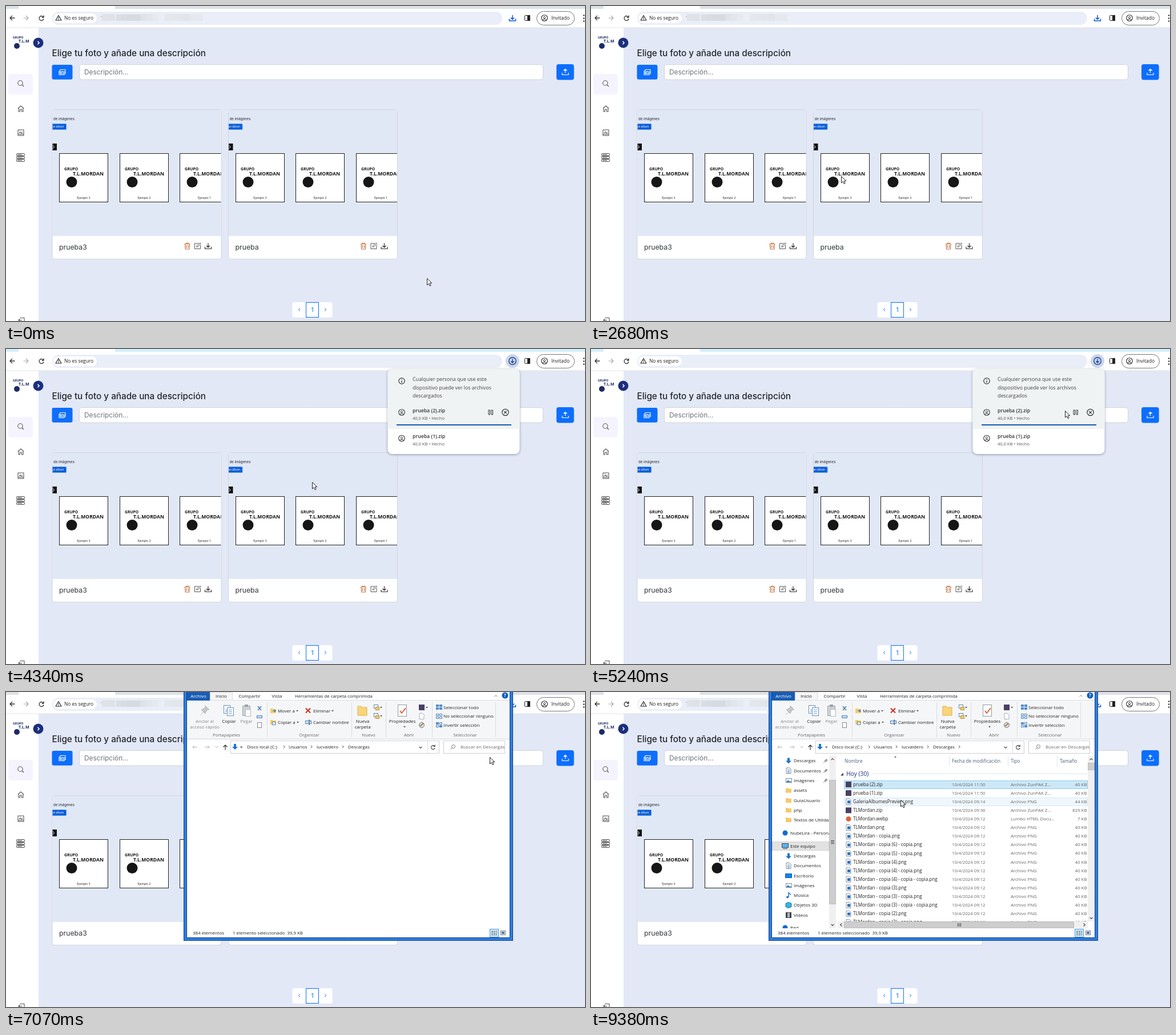
Animation, 1014 px wide and 552 px high, one loop 9510 ms. Source, as an HTML page with a canvas:

```html
<!DOCTYPE html>
<html lang="es">
<head>
<meta charset="utf-8">
<title>Galería</title>
<style>
html, body { margin: 0; width: 100%; height: 100%; overflow: hidden; }
canvas { display: block; width: 1014px; height: 552px; }
</style>
</head>
<body>
<canvas id="stage" width="1014" height="552"></canvas>
<script>
const ctx = document.getElementById('stage').getContext('2d');
const LOOP = 9510, STEP = 70;
const WEB = 'Inter, sans-serif', UI = '"Open Sans", "Noto Sans", sans-serif';
const BLUE = '#0d6efd', INK = '#212529', GREY = '#666';

// ---- drawing helpers ----
function rect(x, y, w, h, fill, stroke) {
  if (fill) { ctx.fillStyle = fill; ctx.fillRect(x, y, w, h); }
  if (stroke) { ctx.strokeStyle = stroke; ctx.lineWidth = 1; ctx.strokeRect(x + .5, y + .5, w - 1, h - 1); }
}
function round(x, y, w, h, r, fill, stroke) {
  ctx.beginPath();
  ctx.roundRect(x, y, w, h, r);
  if (fill) { ctx.fillStyle = fill; ctx.fill(); }
  if (stroke) { ctx.strokeStyle = stroke; ctx.lineWidth = 1; ctx.stroke(); }
}
function disc(x, y, r, fill, stroke, width = 1) {
  ctx.beginPath();
  ctx.arc(x, y, r, 0, 7);
  if (fill) { ctx.fillStyle = fill; ctx.fill(); }
  if (stroke) { ctx.strokeStyle = stroke; ctx.lineWidth = width; ctx.stroke(); }
}
function path(d, x, y, stroke, width = 1, fill) {
  const p = new Path2D(d);
  ctx.save();
  ctx.translate(x, y);
  if (fill) { ctx.fillStyle = fill; ctx.fill(p); }
  if (stroke) {
    ctx.strokeStyle = stroke; ctx.lineWidth = width; ctx.lineJoin = 'round';
    ctx.stroke(p);
  }
  ctx.restore();
}
function text(s, x, y, size = 8.1, color = '#222', { font = UI, weight = 400, align = 'left' } = {}) {
  ctx.font = `${weight} ${size}px ${font}`;
  ctx.textAlign = align;
  ctx.fillStyle = color;
  ctx.fillText(s, x, y + size * .34);
}
function clipped(x, y, w, h, draw) {
  ctx.save();
  ctx.beginPath();
  ctx.rect(x, y, w, h);
  ctx.clip();
  draw();
  ctx.restore();
}
const mid = { align: 'center' };
const DOWN = 'M-2.5 -1.2L0 1.3L2.5 -1.2', RIGHT = 'M-1.5 -2.6L1.2 0L-1.5 2.6', LEFT = 'M1.5 -2.6L-1.2 0L1.5 2.6';
const UP = 'M-2.5 1.2L0 -1.3L2.5 1.2', CARET = 'M-2 -1H2L0 1.3Z';
const SAVE = 'M0 -5V2.5M-3 -.5L0 2.5L3 -.5M-5.5 1.5V5H5.5V1.5';
const PERSON = 'M-3.4 3.8C-2 1.2 2 1.2 3.4 3.8M0 -2.6A1.7 1.7 0 1 0 .01 -2.6';

// ---- browser ----
function browser(active, open) {
  rect(0, 0, 1014, 38, '#fff');
  rect(0, 0, 1014, 5, active ? '#d3f0fb' : '#dee1e6');
  round(22, -6, 169, 14, 4, '#fff');
  rect(0, 5, 1014, 33, '#fff');
  path('M4.5 0H-4M0 -4L-4 0L0 4', 11, 21, '#333', 1.3);
  path('M-4.5 0H4M0 -4L4 0L0 4', 35, 21, '#aaa', 1.2);
  path('M3.6 -2A4 4 0 1 0 4 1M4 -5V-1.5H.6', 62, 21.5, '#333', 1.3);
  round(81, 10, 788, 23, 11.5, '#e9eef8');
  round(83, 13, 76, 17, 8.5, '#fff');
  path('M0 -4.5L5 4H-5ZM0 -1.5V1.5M0 2.3V3.2', 92, 21, '#222', 1.1);
  text('No es seguro', 102, 21.3, 8.4);
  if (!active) blurredUrl();
  if (open) {
    disc(887, 21, 12, '#cbd6eb');
    disc(887, 21, 6.2, null, '#173f8f', 1.4);
    path('M0 -3.5V3M-2.7 .4L0 3L2.7 .4', 887, 21, '#173f8f', 1.4);
  } else path(SAVE, 887, 21, '#0b57d0', 1.5);
  round(908.5, 16.5, 9, 9, 1, '#fff', '#222');
  rect(913, 16, 5, 10, '#222');
  round(929.5, 9.5, 66, 24, 12, '#fff', '#777');
  disc(943, 21, 5.3, null, '#222', 1.1);
  path(PERSON, 943, 21, '#222');
  text('Invitado', 955, 21.3, 8.5);
  for (const y of [16.5, 21.5, 26.5]) disc(1012, y, 1.2, '#333');
  rect(0, 37.5, 1014, 1, '#e1e4ec');
}
function blurredUrl() {
  rect(166, 18, 2, 1, '#a5a9b0');
  for (let i = 0; i < 16; i++) {
    if (i === 9) continue;
    const n = (i * 37 + 11) % 17, g = 233 - n * (i < 7 ? .6 : .3);
    rect(168 + i * 11, 14, 11, 12, `rgb(${g - 3},${g},${g + 5})`);
  }
  rect(193, 15, 42, 11, 'rgba(170,175,190,.2)');
}

// ---- web page ----
function brand(x, y, color, small) {
  const o = { weight: 700 };
  text('GRUPO', x, y, small ? 5.2 : 6.8, color, o);
  text(small ? 'T.L.M' : 'T.L.MORDAN', x + (small ? 10 : 15), y + (small ? 6.5 : 8.5), small ? 7.2 : 8.6, color, o);
  disc(x + (small ? 7 : 13), y + (small ? 15 : 22.5), small ? 5 : 9.5, color);
}
function sidebar() {
  rect(0, 38, 57, 514, '#fff');
  brand(12, 55, '#1d2b64', true);
  disc(56.5, 64.5, 9, '#1b2f7d');
  path(RIGHT, 57, 64.5, '#fff', 1.5);
  round(4, 119, 43, 36, 4, '#f5f4fe');
  const c = '#555';
  disc(25, 135, 4.2, null, c, 1.1);
  path('M3 3L6 6', 25, 135, c, 1.2);
  path('M-5 -.5L0 -5L5 -.5M-4 -1.3V5H-1.5V1H1.5V5H4V-1.3', 26, 180, c, 1.1);
  path('M-5 -5H5V5H-5ZM-5 3H5M-3 1L-1 -1L1 1L2 0L3 1M-2 -3H-1', 26, 222, c, 1.1);
  for (const y of [258.5, 263.5, 268.5]) {
    round(18.5, y, 14, 4, 1, null, '#444');
    rect(20, y + 1.5, 8, 1, '#444');
  }
  path('M-2 -2V-3H5V5H-2M1 1H-5M-3 -1L-5 1L-3 3', 27, 549.5, c, 1.1);
}
function card(x, name) {
  round(x, 181.5, 296, 262, 4, '#fff', '#d0d4dc');
  clipped(x + .5, 182, 295, 221, () => {
    rect(x, 182, 296, 221, '#e1e8f5');
    text('de imágenes', x + 2, 198, 6.1, INK, { font: WEB });
    round(x - 4, 206.5, 28.5, 10, 1, '#0b5ed7', '#5598f2');
    text('un álbum', x, 211.5, 4.7, '#fff', { font: WEB });
    rect(x, 241, 8, 12, '#111');
    path(RIGHT, x + 2.5, 247, '#fff', 1);
    for (let i = 0; i < 3; i++) {
      const tx = Math.round(x + 12.4 + i * 105.4);
      rect(tx, 258, 86, 86, '#fff', '#222');
      brand(tx + 9, 286, '#161616');
      text('Ejemplo ' + (3 - i), tx + 43, 336, 5, '#222', { font: WEB, align: 'center' });
    }
  });
  text(name, x + 12, 422.5, 12.3, '#343a40', { font: WEB });
  path('M-5 -3.5H5M-2 -3.5V-5H2V-3.5M-4 -3.5L-3.4 5.5H3.4L4 -3.5M-1.6 -1.5V3.5M1.6 -1.5V3.5', x + 236.5, 420.5, '#c4703f', 1.1);
  path('M2 -4.5H-5V5H5V-1.5M-1.8 2L-1.2 -.5L4.5 -5.5L5.8 -4L.5 1.2Z', x + 254.5, 420.5, '#555');
  path(SAVE, x + 273, 420.5, '#333', 1.2);
}
function page() {
  rect(0, 38, 1014, 514, '#e3e8f7');
  sidebar();
  text('Elige tu foto y añade una descripción', 80.5, 82.5, 15.28, INK, { font: WEB, weight: 500 });
  round(80.5, 103, 36, 25.7, 3, BLUE);
  path('M-3.5 -4.5H5.5V2.5H-3.5ZM-3.5 -2H-5.5V4.5H3.5V2.5M-3 1.5L0 -1.5L2 .5L3.5 -1L5 1', 98.5, 116, '#fff', 1.1);
  round(128.5, 102.5, 812, 26.5, 4, '#fff', '#ced4da');
  text('Descripción...', 137, 115.7, 11.9, '#6c757d', { font: WEB });
  round(964, 102, 30.7, 27.4, 4, BLUE);
  path('M0 2V-5M-3 -2L0 -5L3 -2M-5.5 1.5V5H5.5V1.5', 979.5, 115.5, '#fff', 1.2);
  card(81, 'prueba3');
  card(389.5, 'prueba');
  round(501.5, 519, 70, 27, 4, '#fff');
  rect(525, 519, 23, 27, '#fff', BLUE);
  text('1', 536.5, 532.5, 11, BLUE, { font: WEB, align: 'center' });
  path(LEFT, 513.5, 532, BLUE);
  path(RIGHT, 559.5, 532, BLUE);
}

// ---- downloads bubble ----
function bubble(alpha) {
  ctx.save();
  ctx.globalAlpha = alpha;
  ctx.shadowColor = 'rgba(40,50,80,.45)';
  ctx.shadowBlur = 4;
  ctx.shadowOffsetY = 1;
  round(668.5, 35, 231, 149, 8, '#fff');
  ctx.shadowColor = 'transparent';
  round(668.5, 35, 231, 105, [8, 8, 0, 0], '#f0f3f3');
  disc(693, 56, 5.2, null, '#333', 1.2);
  path('M0 -.5V3M0 -3V-1.8', 693, 56, '#333', 1.3);
  ['Cualquier persona que use este', 'dispositivo puede ver los archivos', 'descargados']
    .forEach((s, i) => text(s, 712, 53.5 + i * 14.4, 8.8, '#444'));
  ['prueba (2).zip', 'prueba (1).zip'].forEach((s, i) => {
    const y = 108 + i * 45.5;
    disc(693, y + 3, 5.3, null, '#333', 1.1);
    path(PERSON, 693, y + 3, '#333');
    text(s, 712, y, 8.7, '#333', { weight: 600 });
    text('40,0 KB • Hecho', 712, y + 13, 7.6, '#555');
  });
  path('M-3.5 -4H-1V4H-3.5ZM1.5 -4H4V4H1.5Z', 848.5, 111, '#333');
  disc(874.5, 111, 5.7, null, '#333', 1.2);
  path('M-2.3 -2.3L2.3 2.3M2.3 -2.3L-2.3 2.3', 874.5, 111, '#333', 1.2);
  rect(684, 132, 201, 2, '#1558b8');
  ctx.restore();
}

// ---- file explorer ----
const FOLDER = 'M-5 -4H-1L0 -3H5V4H-5Z', SHEET = 'M-4 -5H2L4 -3V5H-4Z';
function icon(kind, x, y) {
  if (kind === 'down') path('M-2 -5H2V0H5L0 5L-5 0H-2Z', x, y, null, 1, '#1976d2');
  if (kind === 'sheet') {
    path(SHEET, x, y, '#7c8794', 1, '#fff');
    path('M-2 -1.5H2M-2 1H2M-2 3H2', x, y, '#3c82c4');
  }
  if (kind === 'folder') path(FOLDER, x, y, null, 1, '#f5ca67');
  if (kind === 'image') {
    rect(x - 5, y - 4, 11, 8, '#fff', '#7d8b99');
    path('M-4 3L-1 -1L2 2L3 1L5 3Z', x, y, null, 1, '#2f7ecb');
  }
  if (kind === 'pc') {
    rect(x - 6, y - 5, 12, 8, '#59b4f5', '#34495e');
    rect(x - 4, y + 4, 8, 1, '#34495e');
  }
  if (kind === 'desk') rect(x - 6, y - 4, 12, 8, '#1383e8', '#0b62b5');
  if (kind === 'note') {
    disc(x - 2, y + 3, 2, '#1678d4');
    path('M0 3V-5L4 -1', x, y, '#1678d4', 1.5);
  }
  if (kind === 'cube') path('M0 -5L5 -3V3L0 5L-5 3V-3Z', x, y, '#0e79b5', 1, '#39b1e6');
  if (kind === 'film') {
    rect(x - 5, y - 5, 10, 10, '#444');
    rect(x - 2, y - 4, 4, 8, '#a5b6c7');
  }
  if (kind === 'dot') disc(x, y, 4.5, '#0f6cd0');
  if (kind === 'zip') rect(x - 5, y - 5, 10, 10, '#4a3f66');
  if (kind === 'web') disc(x, y, 4.5, '#e2603a');
  if (kind === 'png') {
    path(SHEET, x, y, '#8793a0', 1, '#fff');
    rect(x - 2, y - 2, 5, 5, '#2b72c2');
  }
}
const NAV = [
  [120.5, 'down', 'Descargas'], [138, 'sheet', 'Documentos'], [155, 'image', 'Imágenes'],
  [172.5, 'folder', 'assets'], [190, 'folder', 'GuiaUsuario'], [207, 'folder', 'php'],
  [224, 'folder', 'Textos de Utilidad'], [247, 'dot', 'NubeLira - Personal'], [270, 'pc', 'Este equipo'],
  [287.5, 'down', 'Descargas'], [304.5, 'sheet', 'Documentos'], [322, 'desk', 'Escritorio'],
  [339, 'image', 'Imágenes'], [356.5, 'note', 'Música'], [373.5, 'cube', 'Objetos 3D'],
  [391, 'film', 'Vídeos'], [413, 'dot', 'Red']
];
const copies = ['', ' - copia', ' - copia (6) - copia', ' - copia (5) - copia', ' - copia (4)', ' - copia (4) - copia',
  ' - copia (4) - copia - copia', ' - copia (3)', ' - copia (3) - copia', ' - copia (3) - copia - copia',
  ' - copia (2)', ' - copia (2) - copia'];
const FILES = [
  ['zip', 'prueba (2).zip', '11:50', 40], ['zip', 'prueba (1).zip', '11:50', 40],
  ['png', 'GaleriaAlbumesPreview.png', '09:14', 44], ['zip', 'TLMordan.zip', '09:36', 829],
  ['web', 'TLMordan.webp', '09:12', 7],
  ...copies.map(c => ['png', `TLMordan${c}.png`, '09:12', 40])
];
const TYPES = { zip: 'Archivo ZunPAK Z...', png: 'Archivo PNG', web: 'Lumbo HTML Docu...' };

function frame() {
  const c = '#2b7de0';
  rect(311, 0, 6, 436, c);
  rect(882, 0, 6, 436, c);
  rect(311, 431, 577, 5, c);
  path('M.5 0V435.5H576.5V0M5.5 0V430.5H571.5V0', 311, 0, '#17407c');
}
function ribbon() {
  rect(317, 15, 565, 67, '#f5f6f7');
  rect(317, 14, 565, 1, '#dcdde0');
  rect(317, 82, 565, 1, '#d5d6d9');
  rect(317, 0, 40, 15, '#1a5cb4');
  rect(357, 0, 40, 15, '#f5f6f7', '#dcdde0');
  text('Archivo', 337, 7, 8, '#fff', mid);
  text('Inicio', 377, 7, 8, '#222', mid);
  text('Compartir', 426.5, 7, 8, '#222', mid);
  text('Vista', 474.5, 7, 8, '#222', mid);
  text('Herramientas de carpeta comprimida', 506, 7, 7.75);
  path(UP, 858, 7, '#777');
  disc(874, 6, 5.5, '#0c5fbf');
  text('?', 874, 6, 8, '#fff', { weight: 700, align: 'center' });
  for (const x of [457, 605, 665, 746, 857]) rect(x, 18, 1, 61, '#dcdde0');
  [['Portapapeles', 386], ['Organizar', 531], ['Nuevo', 635], ['Abrir', 706], ['Seleccionar', 804]]
    .forEach(([s, x]) => text(s, x, 75, 7.8, GREY, mid));
  [['Anclar al', 348, 51, '#888'], ['acceso rápido', 348, 61, '#888'], ['Copiar', 390.5, 51], ['Pegar', 421, 51, '#888'],
    ['Nueva', 624.5, 51], ['carpeta', 624.5, 61], ['Propiedades', 694, 51]]
    .forEach(([s, x, y, c = '#222']) => text(s, x, y, 8, c, mid));
  path('M1 -8L8 -1L5 -1L2 3L1 6L-6 -1L-3 -2L1 -5ZM-2 3L-7 8', 348, 32, '#b5b8bc', 1, '#c4c7ca');
  for (const x of [386, 392]) {
    rect(x - 5, x === 386 ? 23 : 27, 12, 15, '#fff', '#6c8fb5');
    for (let i = 0; i < 3; i++) rect(x - 2, 31 + i * 3, 6, 1, '#6ba3dc');
  }
  rect(414, 24, 14, 18, '#cdd2d8', '#a0a6ad');
  rect(418, 22, 6, 4, '#9aa0a8');
  rect(419, 30, 10, 13, '#fff', '#b3b8be');
  path('M-3 -4L3 3M3 -4L-3 3', 444, 29, '#3c6fa5', 1.3);
  rect(439, 41, 10, 5, '#c5dcf2', '#4c84bd');
  rect(440, 53, 8, 10, '#fff', '#888');
  path(FOLDER, 468, 33, null, 1, '#f5ca67');
  path('M-1 0H4M2 -2L4 0L2 2', 468, 33, '#1976d2', 1.2);
  path(FOLDER, 468, 53, null, 1, '#f5ca67');
  rect(466, 52, 6, 6, '#fff', '#4c84bd');
  path('M-4 -4L4 4M4 -4L-4 4', 529, 32.5, '#d02a1e', 1.9);
  rect(524, 50, 11, 6, '#cbe2f7', '#4c84bd');
  path('M0 -5V5', 531, 53, '#333');
  text('Mover a', 476, 33, 7.9); path(CARET, 510, 33, null, 1, '#444');
  text('Copiar a', 476, 53, 7.9); path(CARET, 511, 53, null, 1, '#444');
  text('Eliminar', 538, 33, 7.9); path(CARET, 572, 33, null, 1, '#444');
  text('Cambiar nombre', 538, 53, 7.9);
  path('M-8 -7H-2L0 -5H8V9H-8Z', 624, 32, '#e0b24b', 1, '#f8d57a');
  for (const y of [27, 42]) {
    rect(644, y - 5, 8, 7, '#fff', '#5e82a8');
    rect(647, y - 1, 7, 6, '#f5ca67', '#b69446');
    path(CARET, 657, y, null, 1, '#444');
  }
  rect(686, 22, 16, 21, '#fff', '#929aa3');
  path('M-4 0L-1 4L6 -5', 694, 33, '#e2603a', 2);
  path(CARET, 698, 61, null, 1, '#444');
  icon('zip', 728, 27);
  path(CARET, 737, 27, null, 1, '#444');
  path(SHEET, 728, 42.5, '#a6adb5', 1, '#fff');
  disc(728, 58, 4.5, '#ddd', '#777');
  path('M-3 2L3 -3', 728, 58, '#8a5a2b', 1.5);
  ['Seleccionar todo', 'No seleccionar ninguno', 'Invertir selección'].forEach((s, i) => {
    const y = 27 + i * 15.5;
    for (let k = 0; k < 4; k++)
      rect(753 + (k % 2) * 6, Math.round(y) - 5 + (k >> 1) * 5, 5, 4, i === 1 || (i === 2 && k % 3) ? '#fff' : '#4d9ae0', '#4c84bd');
    text(s, 766, y, 8);
  });
}
function addressBar(t) {
  path('M4 0H-4M-1 -3L-4 0L-1 3', 331, 96.5, '#b5b5b5');
  path('M-4 0H4M1 -3L4 0L1 3', 352, 96.5, '#b5b5b5');
  path(DOWN, 369, 96, '#aaa');
  path('M0 4.5V-4M-3.5 -.5L0 -4L3.5 -.5', 384, 97, '#333', 1.2);
  rect(393, 85, 366, 23, '#fff', '#cfcfcf');
  rect(738, 86, 1, 21, '#ddd');
  icon('down', 401, 96);
  text('«', 410, 96, 9);
  [['Disco local (C:)', 422, 487], ['Usuarios', 495, 535], ['lucvaldero', 544, 590], ['Descargas', 599, 645]]
    .forEach(([s, x, arrow]) => {
      text(s, x, 96, 7.9);
      if (arrow < 645 || t >= 7410) path('M-1 -2.3L1.2 0L-1 2.3', arrow, 96, '#444');
    });
  path(DOWN, 726, 97, '#444', 1.2);
  path('M2.8 -2A3.4 3.4 0 1 0 3.3 1M3.2 -4.5V-1.6H.5', 748, 97, '#444', 1.1);
  rect(766, 85, 108, 23, '#fff', '#cfcfcf');
  disc(783.5, 95.5, 3, null, '#777');
  path('M-2.2 2.2L-5 5', 783.5, 95.5, '#777');
  clipped(767, 86, 106, 21, () => text('Buscar en Descargas', 796, 96.5, 8, GREY));
}
function bar(x, y, w, h, from, size) {
  const tall = h > w, cx = x + w / 2, cy = y + h / 2;
  rect(x, y, w, h, '#f0f0f0');
  if (tall) {
    rect(x, from, w, size, '#cdcdcd', '#bdbdbd');
    path(UP, cx, y + 6, '#444', 1.2);
    path(DOWN, cx, y + h - 6, '#444', 1.2);
  } else {
    rect(from, y, size, h, '#cdcdcd', '#bdbdbd');
    path(LEFT, x + 6, cy, '#444', 1.2);
    path(RIGHT, x + w - 6, cy, '#444', 1.2);
  }
}
function navPane() {
  clipped(317, 111, 100, 303, () => {
    rect(317, 262, 100, 16, '#e2e2e2', '#d2d2d2');
    NAV.forEach(([y, kind, label], i) => {
      const top = i === 7 || i === 8 || i === 16;
      icon(kind, top ? 340 : 346, y);
      text(label, top ? 349 : 355, y, 8);
      if (i < 3) path('M-2 0L1 -3L3 -1L0 2ZM-1 1L-4 4', 411, y, '#888', 1, '#aaa');
    });
  });
  bar(417, 112, 12, 302, 154, 218);
  for (let i = 0; i < 3; i++) rect(420, 260 + i * 2.5, 6, 1, '#444');
}
function fileList(p) {
  const overHead = p.y >= 112 && p.y < 131;
  const hover = p.x < 870 ? Math.floor((p.y - 155) / 15.1) : -1;
  if (overHead && p.x > 817) {
    rect(817, 112, 53, 18, '#d9ebf9', '#9ccbf0');
    rect(864, 112, 1, 18, '#8cc0ec');
    path(CARET, 867.5, 121, null, 1, '#444');
  }
  [['Nombre', 444], ['Fecha de modificación', 632], ['Tipo', 735], ['Tamaño', 821]]
    .forEach(([s, x]) => text(s, x, 121.5, 8.2, '#4c607a'));
  for (const x of [627, 730, 816]) rect(x, 112, 1, 18, '#e2e2e2');
  path(CARET, 533, 114, null, 1, '#555');
  if (p.y >= 135 && p.y < 152) rect(432, 135, 438, 17, '#e5f3ff');
  path('M2 -2.5V2.5H-3Z', 440, 144, null, 1, '#444');
  text('Hoy (30)', 447, 143.5, 10.3, '#1e3287');
  rect(493, 143, 377, 1, '#dfe5ee');
  clipped(432, 152, 438, 250, () => FILES.forEach(([kind, name, time, kb], i) => {
    const y = 162 + i * 15.1, top = Math.round(y - 7);
    if (i === 0) rect(443, top, 427, 15, '#cce8f8', '#8fcaf0');
    else if (i === hover) rect(443, top, 427, 15, '#eff7fd', '#d5e9f8');
    icon(kind, 451, y);
    text(name, 459, y, 8.1);
    text('10/4/2024 ' + time, 632, y, 7.75, GREY);
    text(TYPES[kind], 735, y, 7.9, GREY);
    text(kb + ' KB', 868.5, y, 7.9, GREY, { align: 'right' });
  }));
  bar(870, 112, 12, 290, 124, 13);
  bar(432, 402, 438, 12, 443, 403);
  for (let i = 0; i < 3; i++) rect(642 + i * 2.5, 405, 1, 6, '#444');
}
function statusBar() {
  rect(317, 414, 565, 16, '#fff');
  text('384 elementos', 327, 422.5, 8);
  text('1 elemento seleccionado  39,9 KB', 397, 422.5, 7.9);
  rect(847, 415, 16, 15, '#cce8f8', '#4d9bd6');
  for (let i = 0; i < 3; i++) path('M-5 0H-2M-1 0H2M3 0H5', 855, 419.5 + i * 3, '#444');
  rect(866, 418, 9, 8, '#fff', '#777');
  rect(868, 420, 5, 4, '#447bb0');
}
function explorer(t, p) {
  if (t >= 7000) rect(317, 0, 565, 431, '#fff');
  if (t >= 7070) { ribbon(); addressBar(t); statusBar(); }
  if (t >= 7140) { navPane(); fileList(p); }
  frame();
}

// ---- pointer: [start, steps, x, y] ----
const MOVES = [
  [70, 6, 662, 424], [490, 2, 666, 423], [2050, 14, 414, 285], [3040, 4, 401, 291],
  [3990, 14, 829, 108], [4970, 1, 830, 108], [6180, 6, 851, 111], [7000, 4, 843, 117],
  [8270, 14, 550, 191], [9240, 3, 542, 189]
];
const ease = u => u < .5 ? 4 * u ** 3 : 1 - (2 - 2 * u) ** 3 / 2;
function pointerAt(t) {
  let x = 737, y = 477;
  for (const [start, steps, nx, ny] of MOVES) {
    if (t < start) break;
    const u = ease(Math.min(1, (Math.floor((t - start) / STEP) + 1) / steps));
    x += (nx - x) * u;
    y += (ny - y) * u;
  }
  return { x: Math.round(x), y: Math.round(y) };
}
function pointer({ x, y }) {
  path('M0 0V11.5L2.7 9L4.6 13.2L6.6 12.3L4.7 8.2H8.3Z', x + .5, y + .5, '#222', 1, '#fff');
}

function draw(t) {
  const active = (t >= 1560 && t < 2050) || (t >= 3520 && t < 6730);
  const open = t >= 3660 && t < 5450;
  const p = pointerAt(t);
  page();
  browser(active, open);
  if (open) bubble(t < 5310 ? 1 : 1 - (Math.floor((t - 5310) / STEP) + 1) / 3);
  if (t >= 6930) explorer(t, p);
  pointer(p);
}
const began = performance.now();
function tick() {
  draw((performance.now() - began) % LOOP);
  requestAnimationFrame(tick);
}
tick();
</script>
</body>
</html>
```
